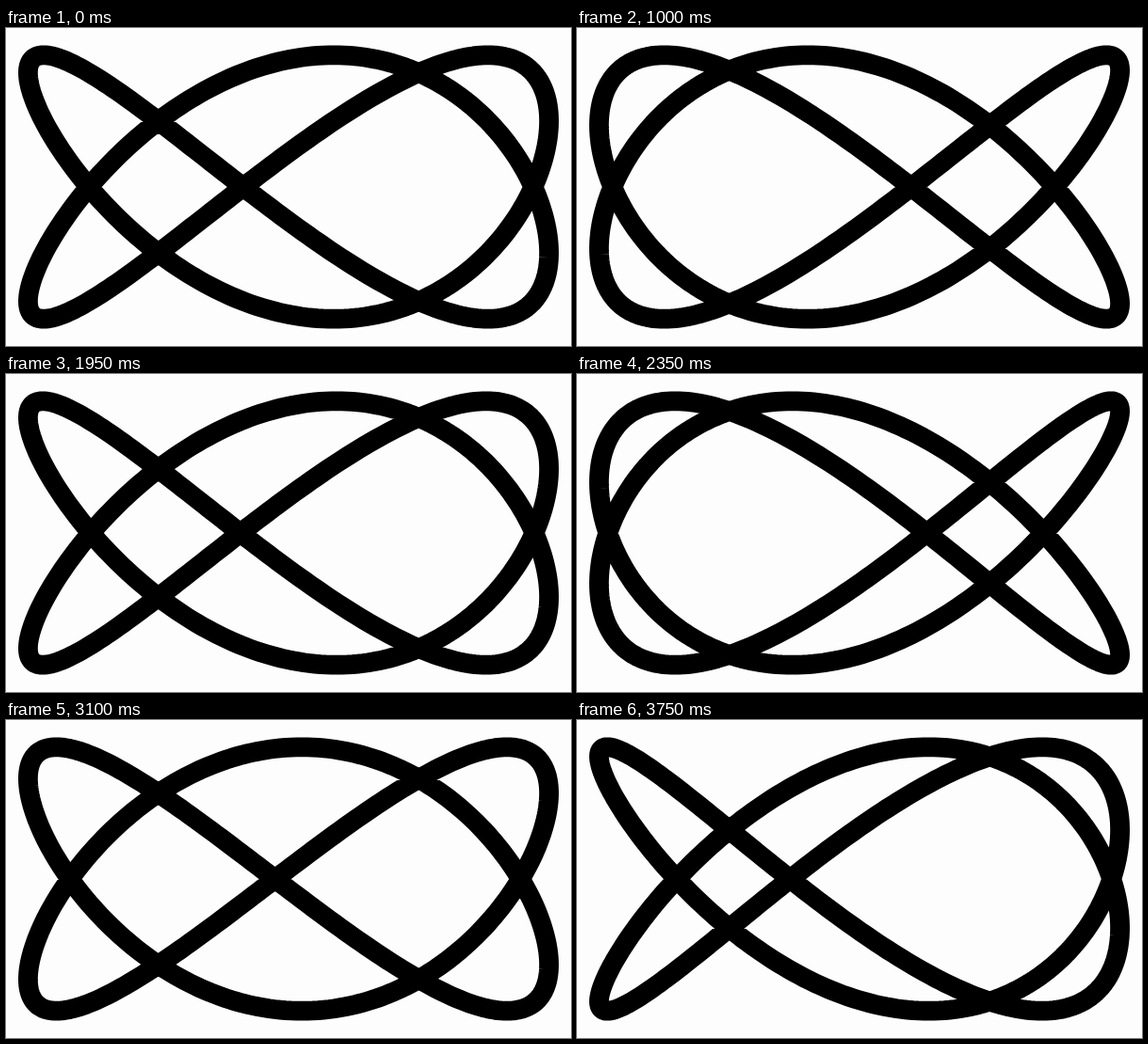
An HTML page for the animation above (3800 ms loop, 600 px wide and 338 px high).

```html
<!DOCTYPE html>
<html lang="en">
<head>
<meta charset="utf-8">
<title>Lissajous curve</title>
<style>
  html, body { margin: 0; width: 100%; height: 100%; overflow: hidden; background: #fdfdfd; }
  svg { display: block; width: 100vw; height: 100vh; }
</style>
</head>
<body>
<svg viewBox="0 0 600 338" preserveAspectRatio="none">
  <path id="curve" fill="none" stroke="#000" stroke-width="20.8" stroke-linejoin="round"/>
</svg>
<script>
  const LOOP = 3800, STEP = 50;
  const CX = 300, CY = 169, RX = 276.6, RY = 140.2;
  const POINTS = 600;
  const curve = document.getElementById('curve');

  // Phase in degrees: a short run-up, then constant speed
  function phase(n) {
    const lag = 1.7 * (1 - Math.exp(-n / 2));
    return 280 - 3.2 * (n - lag);
  }

  function shape(deg) {
    const phi = deg * Math.PI / 180;
    let d = '';
    for (let i = 0; i < POINTS; i++) {
      const a = i / POINTS * 2 * Math.PI;
      const x = CX + RX * Math.cos(2 * a + phi);
      const y = CY - RY * Math.cos(3 * a);
      d += (i ? 'L' : 'M') + x.toFixed(2) + ' ' + y.toFixed(2);
    }
    return d + 'Z';
  }

  let last = -1;
  function draw(ms) {
    const n = Math.floor((ms % LOOP) / STEP);
    if (n === last) return;
    last = n;
    curve.setAttribute('d', shape(phase(n)));
  }

  const start = performance.now();
  function tick() {
    draw(performance.now() - start);
    requestAnimationFrame(tick);
  }
  draw(0);
  requestAnimationFrame(tick);
</script>
</body>
</html>
```
